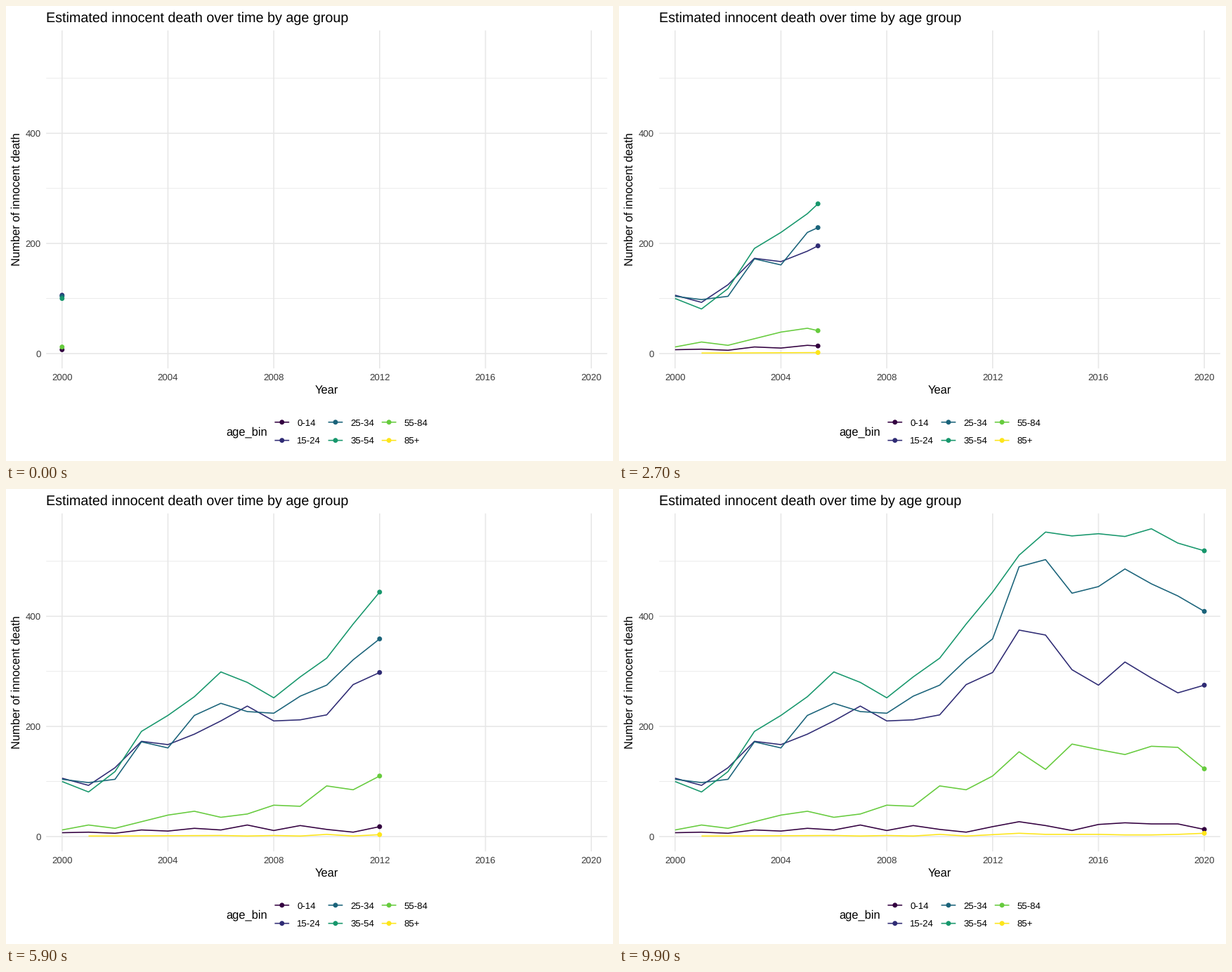
These frames come from a looping animation (864 px wide and 648 px high, 10 s). A matplotlib script:

```python
import numpy as np
import matplotlib.pyplot as plt
from matplotlib.animation import FuncAnimation
from matplotlib.patches import Circle

W, H, DPI = 864, 648, 108
FRAMES = 100
LEFT, RIGHT, TOP, BOTTOM = 57.2, 855.75, 34.8, 516.1
GRID, TICK = "#e7e7e7", "#3b3b3b"
LINE_W, DOT_R = 1.6, 3.45
NA = np.nan

GROUPS = {
    "0-14": ("#330040", [7, 8, 6, 12, 10, 15, 12, 21, 11, 20, 13,
                         8, 18, 27, 20, 11, 22, 25, 23, 23, 13]),
    "15-24": ("#2f2b74", [106, 93, 125, 173, 167, 186, 210, 237, 210, 212, 221,
                          276, 298, 375, 366, 303, 275, 317, 288, 261, 275]),
    "25-34": ("#1a637a", [104, 98, 104, 172, 161, 220, 242, 227, 224, 255, 275,
                          321, 359, 490, 503, 442, 454, 486, 459, 437, 409]),
    "35-54": ("#17976c", [100, 81, 118, 191, 220, 254, 299, 280, 252, 290, 324,
                          386, 444, 511, 553, 546, 550, 545, 559, 533, 519]),
    "55-84": ("#66cb3d", [12, 21, 15, 27, 39, 46, 35, 41, 57, 55, 92,
                          85, 110, 154, 122, 168, 158, 149, 164, 162, 123]),
    "85+": ("#fde51a", [NA, 1, 1, NA, NA, NA, 2, 1, 2, 1, 4,
                        1, NA, 6, 4, 4, 4, 3, 3, 4, 6]),
}

plt.rcParams.update({
    "font.family": "Liberation Sans",
    "text.hinting": "none",
    "text.hinting_factor": 8,
    "toolbar": "None",
})

fig = plt.figure(figsize=(W / DPI, H / DPI), dpi=DPI, facecolor="white")
ax = fig.add_axes([0, 0, 1, 1])
ax.set(xlim=(0, W), ylim=(H, 0))
ax.axis("off")


def px(year):
    return 79.8 + 37.667 * (year - 2000)


def py(value):
    return 495.0 - 0.7842 * value


def stroke(x, y, color, width=LINE_W, z=1):
    line, = ax.plot(x, y, color=color, lw=width * 72 / DPI, zorder=z,
                    solid_capstyle="butt", solid_joinstyle="round")
    line.set_snap(False)
    return line


def dot(x, y, color, z):
    return ax.add_patch(Circle((x, y), DOT_R, fc=color, lw=0, zorder=z))


def label(x, y, text, size, color="black", ha="left", **kw):
    ax.text(x, y, text, fontsize=size, color=color, ha=ha,
            va="baseline", **kw)


# Panel grid and axes
for v in (100, 300, 500):
    stroke([LEFT, RIGHT], [py(v)] * 2, GRID, LINE_W / 2)
for v in (0, 200, 400):
    stroke([LEFT, RIGHT], [py(v)] * 2, GRID)
    label(49.8, py(v) + 4.7, str(v), 8.8, TICK, "right")
for year in range(2000, 2021, 4):
    stroke([px(year)] * 2, [TOP, BOTTOM], GRID)
    label(px(year), 533, str(year), 8.8, TICK, "center")

label(LEFT, 22.5, "Estimated innocent death over time by age group", 13.2)
label((LEFT + RIGHT) / 2, 551.8, "Year", 11, ha="center")
ax.text(20.1, (TOP + BOTTOM) / 2, "Number of innocent death", fontsize=11,
        rotation=90, rotation_mode="anchor", ha="center", va="baseline")

# Legend, filled by column
label(312.9, 611.6, "age_bin", 11)
for i, (name, (color, _)) in enumerate(GROUPS.items()):
    col, row = divmod(i, 2)
    x, y = 392.8 + 76.17 * col, 592.7 + 25.92 * row
    stroke([x - 10.37, x + 10.37], [y, y], color)
    dot(x, y, color, 2)
    label(x + 21.2, y + 4.7, name, 8.8)


class Series:
    """A line that grows with a dot at its head; years land on whole frames."""

    def __init__(self, color, values, order):
        values = np.array(values, float)
        known = ~np.isnan(values)
        step = np.arange(len(values))
        self.key = np.round((FRAMES - 1) * step / step[-1])[known]
        self.x = px(2000 + step[known])
        self.y = py(values[known])
        self.line = stroke([], [], color, z=3 + order)
        self.dot = dot(0, 0, color, 20 + order)

    def update(self, frame):
        started = frame >= self.key[0]
        self.dot.set_visible(started)
        self.line.set_visible(started)
        if not started:
            return
        head = (np.interp(frame, self.key, self.x),
                np.interp(frame, self.key, self.y))
        past = self.key < frame
        self.line.set_data(np.append(self.x[past], head[0]),
                           np.append(self.y[past], head[1]))
        self.dot.center = head


series = [Series(color, values, i)
          for i, (color, values) in enumerate(GROUPS.values())]


def draw(frame):
    for s in series:
        s.update(frame)
    return []


anim = FuncAnimation(fig, draw, frames=FRAMES, interval=100,
                     repeat=True, repeat_delay=0, blit=False)
plt.show()
```
